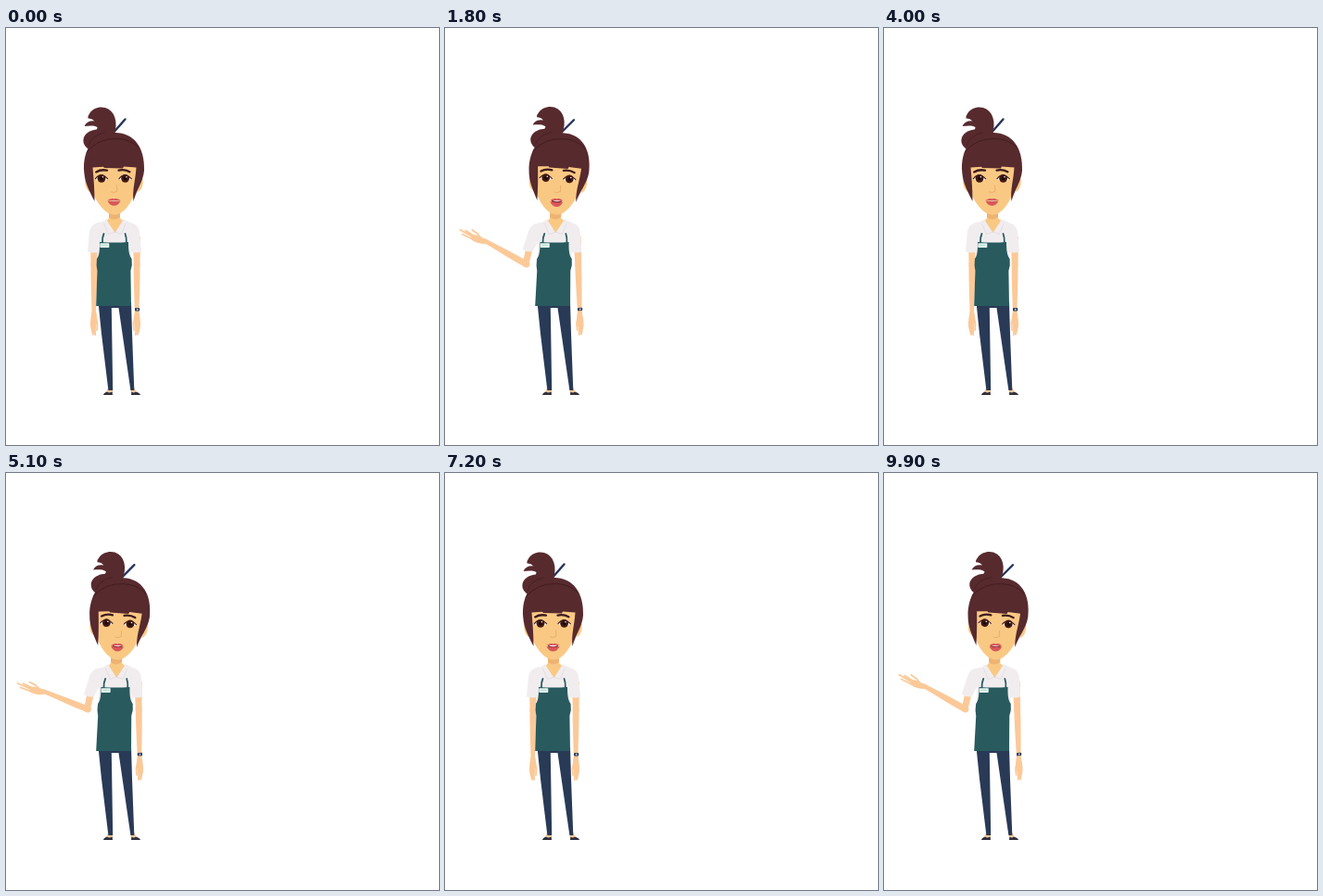
These frames come from a looping animation (467 by 450 pixels, 10 s). An HTML page without scripts:

```html
<!DOCTYPE html>
<html lang="en">
<head>
<meta charset="utf-8">
<title>Shop assistant presenting</title>
<style>
  /* p: gesture, q: resting arm swing, o: open hand, m: mouth opening */
  @property --p { syntax: "<number>"; inherits: true; initial-value: 0; }
  @property --q { syntax: "<number>"; inherits: true; initial-value: 0; }
  @property --o { syntax: "<number>"; inherits: true; initial-value: 0; }
  @property --m { syntax: "<number>"; inherits: true; initial-value: 0; }

  html, body { margin: 0; width: 100%; height: 100%; overflow: hidden; background: #fff; }
  svg { display: block; width: 467px; height: 450px;
    animation: gesture 10s step-end infinite, talk 2s step-end infinite; }

  .torso { transform-origin: 117px 300px; transform: skewX(calc(var(--p) * -1.3deg)); }
  .head { transform-origin: 117px 212px; transform: rotate(calc(var(--p) * 3deg)); }
  .upper { transform-origin: 97px 213px; transform: rotate(calc(var(--p) * 12deg)); }
  .fore { transform-origin: 95px 256px; transform: rotate(calc(var(--p) * 107deg)); }
  .swing { transform-origin: 140px 225px; transform: rotate(calc(var(--q) * -3deg)); }
  .open { opacity: var(--o); }
  .rest { opacity: calc(1 - var(--o)); }
  .gap { transform-origin: 116.5px 187px; transform: scaleY(calc(.15 + var(--m))); }
  .lower { transform: translateY(calc(var(--m) * 1.6px)); }

  .skin { fill: #fbc998; }
  .face { fill: #f9c984; }
  .shade { fill: #eeb272; }
  .hair { fill: #572a2e; }
  .shirt { fill: #f1edef; }
  .apron { fill: #285a5e; }
  .navy { fill: #293a56; }
  .lip { fill: #d9565a; }
  .line { fill: none; stroke-linecap: round; stroke-linejoin: round; }
  .finger { stroke: #fbc998; stroke-width: 1.8; }
  .dark { stroke: #3d1a1e; }
  .fold { stroke: #ded7dc; stroke-width: .7; }

  @keyframes gesture {
    0% { --p: 0; --q: 0; --o: 0; }
    9% { --p: .1; }
    10% { --p: .3; }
    11% { --p: .55; --q: 0; --o: 0; }
    12% { --p: .79; --q: .3; --o: 0; }
    13% { --p: .94; --q: .7; --o: 1; }
    14%, 24% { --p: 1; --q: 1; --o: 1; }
    25% { --p: .92; --q: 1; }
    26% { --p: .75; --q: .95; }
    27% { --p: .51; --q: .85; }
    28% { --p: .25; --q: .4; }
    29% { --p: .08; --q: .1; --o: 0; }
    30%, 46% { --p: 0; --q: 0; --o: 0; }
    47% { --p: .1; }
    48% { --p: .3; }
    49% { --p: .55; --q: 0; --o: 0; }
    50% { --p: .79; --q: .3; --o: 0; }
    51% { --p: .94; --q: .7; --o: 1; }
    52%, 66% { --p: 1; --q: 1; --o: 1; }
    67% { --p: .92; --q: 1; }
    68% { --p: .75; --q: .95; }
    69% { --p: .51; --q: .85; }
    70% { --p: .25; --q: .4; }
    71% { --p: .08; --q: .1; --o: 0; }
    72%, 90% { --p: 0; --q: 0; --o: 0; }
    91% { --p: .1; }
    92% { --p: .3; }
    93% { --p: .55; --q: 0; --o: 0; }
    94% { --p: .79; --q: .3; --o: 0; }
    95% { --p: .94; --q: .7; --o: 1; }
    96%, 100% { --p: 1; --q: 1; --o: 1; }
  }
  @keyframes talk {
    0% { --m: .1; }
    10% { --m: .5; }
    20% { --m: .8; }
    30% { --m: .6; }
    40% { --m: .2; }
    45% { --m: .4; }
    55% { --m: .6; }
    65% { --m: .4; }
    75% { --m: .05; }
    85% { --m: .8; }
    95%, 100% { --m: .5; }
  }
</style>
</head>
<body>
<svg viewBox="0 0 467 450" role="img" aria-label="Shop assistant in a green apron">
  <defs>
    <path id="upperArm" d="M91 225H99L98.3 256A3.4 3.4 0 0 1 91.5 256Z"/>
    <path id="foreArm" d="M91.5 255A3.4 3.4 0 0 1 98.3 255C98.4 272 97.6 288 97 308H92.6C92.2 290 91.3 272 91.5 255Z"/>
    <g id="hand">
      <path class="skin" d="M92.6 306H97C98.4 310 98.4 316 97.4 321L95 331Q93.6 333 92.8 330L91 322C90.8 316 91.6 311 92.6 306Z"/>
      <path class="line finger" d="M97 312L98.5 319L98 326M95.6 320L96.2 331"/>
    </g>
    <g id="eye">
      <path fill="#fff" d="M-6.5 .8Q-1-7 6.6 .8Q0 6.4-6.5 .8Z"/>
      <circle r="4.4" fill="#44190f"/>
      <circle r="2" fill="#1d0c0b"/>
      <circle cx="1.4" cy="-1.5" r=".8" fill="#fff"/>
      <path class="line dark" stroke-width="1.1" d="M-6.6 .4Q-1-7.2 6.6 .4"/>
    </g>
  </defs>

  <!-- legs and shoes -->
  <path class="skin" d="M110 388H115V394H108ZM134.5 388H138.5L141 394H135Z"/>
  <path class="navy" d="M99.5 296H135L136 330L138.3 391H134.4L121.5 302H113.8L115.2 391H110.4L103 330Z"/>
  <path fill="#30303c" d="M105 396Q105.4 393.6 109 392.4Q111 394.4 114.6 392.4L115 396ZM135 396L135.4 392.4Q138 394.4 140 392.4Q144.4 393.6 145 396Z"/>

  <g class="torso">
    <!-- resting arm -->
    <g class="swing">
      <g class="skin" transform="translate(236) scale(-1 1)">
        <use href="#upperArm"/>
        <use href="#foreArm"/>
        <use href="#hand"/>
      </g>
      <rect class="navy" x="139" y="302" width="5.2" height="3.4" rx=".8"/>
      <rect x="140.8" y="302.8" width="1.8" height="1.8" fill="#b9c4d0"/>
    </g>

    <!-- presenting arm -->
    <g class="upper">
      <use class="skin" href="#upperArm"/>
      <g class="fore">
        <use class="skin" href="#foreArm"/>
        <use class="rest" href="#hand"/>
        <g class="open">
          <path class="skin" d="M92.6 305H97.2C100 309 101.6 314 101 320L97 323L94 319Z"/>
          <path class="line finger" d="M96 318L95.4 331M97.6 320L97.4 336.5M99.8 319L100.4 332M94.4 312L92 318L91.4 325"/>
        </g>
      </g>
      <path class="shirt" d="M102 209Q92 211 90 219L88 241.5Q93 243.2 99 242L104 224Z"/>
    </g>

    <!-- shirt and apron -->
    <path class="shirt" d="M109 206L117 219L126 206L137 211Q143 213 144 220L146 241.5Q141 243 135.5 242L135 250L133 262H100L98.8 250L98.5 222Q98 212 102 210Z"/>
    <path class="line" stroke="#285a5e" stroke-width="1.8" d="M105.5 222Q103.6 226 104 232M128.5 222Q130.2 226 129.8 232"/>
    <path class="apron" d="M101 231Q117 232 132 231C132 239 132.5 245 135.6 249L135.8 256L134.4 262L135 300H97.2L98.4 262L97.6 256L98 249C101 245 101 239 101 231Z"/>
    <rect x="101.3" y="232.3" width="10" height="4.6" rx=".6" fill="#e2f5ee"/>
    <path stroke="#a9d3c8" stroke-width=".8" d="M103 234.6H109.5"/>

    <path class="face" d="M111 197H123V205L126 208L117.5 221L109 208L111 205Z"/>
    <path class="shade" d="M111 197H123V204Q116 209 111 204Z"/>
    <path class="line fold" d="M105.5 211L110.5 222.5L117.5 220L124.5 222.5L129 211"/>

    <g class="head">
      <!-- bun -->
      <path class="line" stroke="#25345c" stroke-width="2.4" d="M114 115L128.5 98.5"/>
      <path class="hair" d="M90 92.5C94 85.5 104 83.6 110.5 87.6C119.5 93 121 107 115 119L90 123C92.5 115 98.5 111 98.5 107C94.5 104.8 90 105.5 84.6 106Q87 99.8 95.5 100.4Q92.5 97.2 88.4 97.5Q88 95 90 92.5Z"/>
      <ellipse class="hair" cx="99" cy="121.5" rx="15.6" ry="12"/>
      <path class="line dark" stroke-width=".6" d="M89 127Q92 116 106 113"/>

      <!-- face -->
      <path class="face" d="M88 162Q84.5 161 85.4 168Q86.4 175 91 177ZM145 162Q148.5 161 147.6 168Q146.6 175 142 177Z"/>
      <path class="face" d="M89 146C88 166 93 182 103 193.5Q110 201.5 117 201.5Q124 201.5 130.5 193.5C139.5 182 144.5 166 144.5 146Z"/>
      <path class="hair" d="M84.3 156C82 131 95 113 118 113C138 113 150 129 149 154C148 166 140.5 175 137.5 187C136 175 139.5 165 140.5 150.5L127 149.5L126 151.5L106 151L105 149.8L93.5 150.5C94.5 162 95.5 175 95.5 187C90 176 85 167 84.3 156Z"/>
      <path class="line dark" stroke-width=".8" d="M87 134Q99 119 119 119.5Q134 119.5 143 129"/>

      <path class="line dark" stroke-width="2.3" d="M97.2 155.4Q102 152.4 109 153.6M121.5 153.6Q128 152.2 133.4 155.2"/>
      <use href="#eye" x="103" y="162.3"/>
      <use href="#eye" x="128.6" y="162.3"/>
      <path class="line" stroke="#e8ad6c" stroke-width="1" d="M119.5 170L120 176Q117 178.5 113.5 177"/>

      <!-- mouth -->
      <ellipse class="gap" cx="116.5" cy="187" rx="5.6" ry="2.2" fill="#8c3038"/>
      <path class="gap" fill="#fff" d="M111.6 186Q116.5 184.8 121.4 186Q116.5 188.4 111.6 186Z"/>
      <path class="lip" d="M109.4 186Q113 183.8 115 184L116.5 184.6L118 184Q120 183.8 123.6 186Q116.5 186.2 109.4 186Z"/>
      <path class="lip lower" d="M109.4 186Q116.5 188.6 123.6 186Q121 191.6 116.5 191.6Q112 191.6 109.4 186Z"/>
    </g>
  </g>
</svg>
</body>
</html>
```
